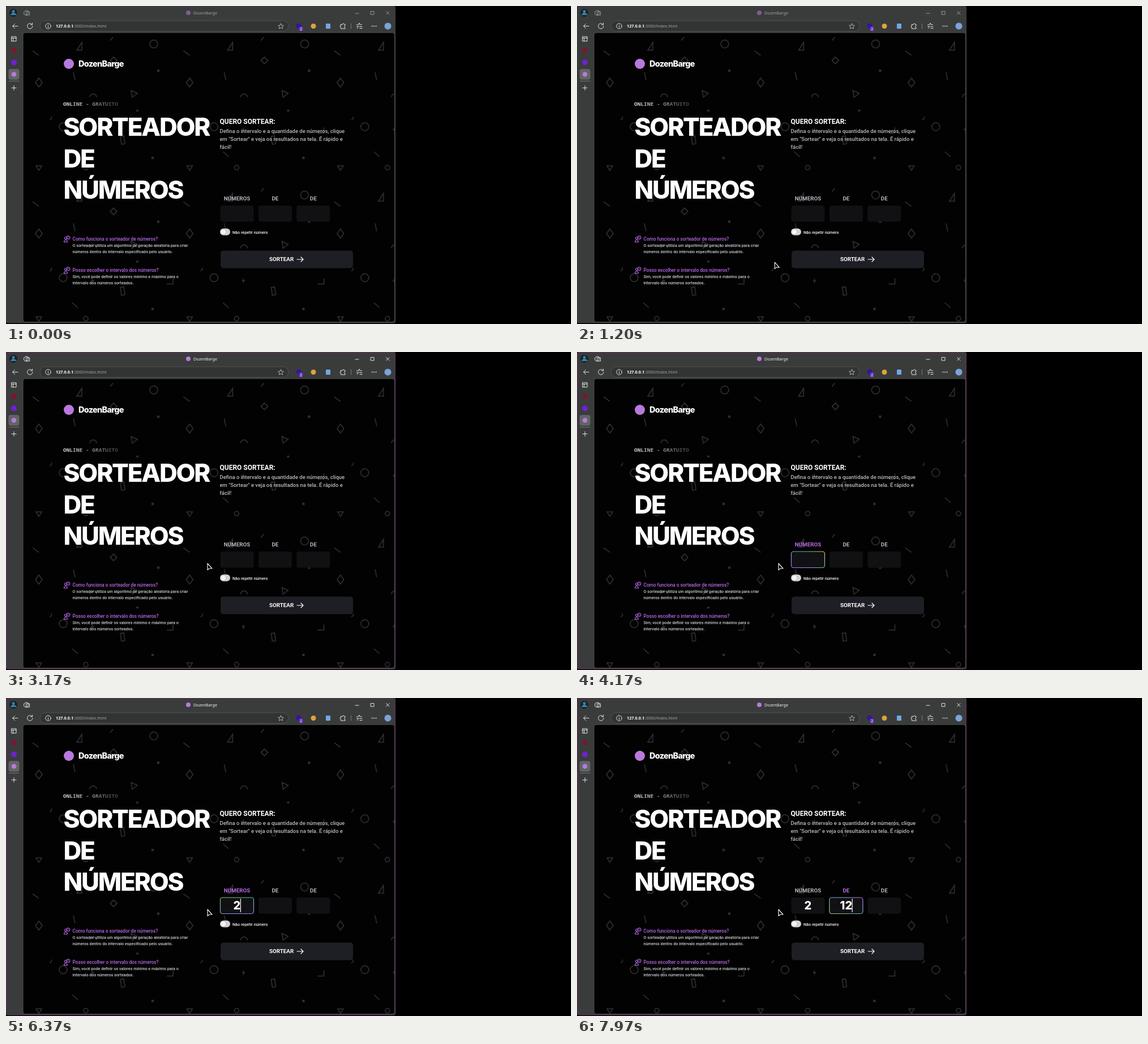
An HTML page for the animation above (8000 ms loop, 998x561 px).

```html
<!DOCTYPE html>
<html lang="pt">
<head>
<meta charset="utf-8">
<style>
html, body { margin: 0; width: 100%; height: 100%; overflow: hidden; background: #000; }
svg { display: block; width: 998px; height: 561px; }
text { white-space: pre; }
.ui { font: 7.3px "Noto Sans", "Open Sans", sans-serif; }
.body { font-family: Roboto, sans-serif; font-weight: 500; }
.bold { font-weight: 700; }
.display { font-family: Inter, sans-serif; font-weight: 800; letter-spacing: -.05em; fill: #fff; }
.mono { font: 600 9.5px "Noto Sans Mono", "DejaVu Sans Mono", monospace; }
.line { fill: none; stroke: #e2e2e2; stroke-linecap: round; stroke-linejoin: round; }
.mid { text-anchor: middle; }
</style>
</head>
<body>
<svg viewBox="0 0 998 561">
  <defs>
    <pattern id="confetti" x="30" y="47" width="266.4" height="266.4" patternUnits="userSpaceOnUse">
      <g fill="none" stroke="#343238" stroke-width="1.5">
        <circle cx="231" cy="20" r="7"/>
        <circle cx="71" cy="166" r="7"/>
        <circle cx="111" cy="238" r="4"/>
        <path d="M28 80l6 8-6 8-6-8zM160 43l6 6-6 6-6-6z"/>
        <path d="M104 17v14H95zM191 102l11 5-9 7zM23 235h10l-5 8z"/>
        <path d="M172 183l6-1 2 14-6 1zM254 177h11v-10"/>
        <path d="M118 114a6 6 0 0 1 12 0"/>
        <path d="M17 32l11 8M89 70l3 14M87 210l10 9M154 14l5-6M50 148q2 4-3 6"/>
      </g>
      <g fill="#343238">
        <path d="M237 65h4v4h-4zM227 219h4v4h-4zM200 136h4v3h-4z"/>
        <path d="M124 166l-4 6h3l-1 5 4-7h-3z"/>
      </g>
    </pattern>
    <linearGradient id="fade" gradientUnits="userSpaceOnUse" x1="101" x2="200" y1="0" y2="0">
      <stop stop-color="#d6d6d6"/><stop offset="1" stop-color="#3c3c46"/>
    </linearGradient>
    <linearGradient id="glow" gradientUnits="userSpaceOnUse">
      <stop stop-color="#b868e8"/><stop offset=".35" stop-color="#8aa0e8"/>
      <stop offset=".65" stop-color="#6ab8a0"/><stop offset="1" stop-color="#e0c070"/>
    </linearGradient>
  </defs>

  <rect width="998" height="561" fill="#000"/>
  <rect width="688" height="559.5" rx="3" fill="#3a3c3b"/>
  <rect id="accent" x=".5" y=".5" width="687" height="558.5" rx="3" fill="none" stroke="#652c62"/>

  <!-- title bar -->
  <g id="titleBar">
    <circle cx="322" cy="12" r="4" fill="#b979dc"/>
    <text class="ui" x="331" y="15" fill="#f0f0f0">DozenBarge</text>
    <path class="line" d="M617 13h6M644.5 9.5h5.500v5.500h-5.500zM671.500 9.500l5.500 5.500M677 9.500l-5.500 5.500"/>
    <path class="line" d="M32 10l4-2.500 3 1.500v5l-4 2.500-3-2zM36 10h5.500v6h-5.500z"/>
  </g>
  <circle cx="13" cy="12" r="7" fill="#14232e"/>
  <path d="M8 16q1-4 5-4t6 4z" fill="#3b81a0"/><circle cx="13" cy="9.500" r="2.500" fill="#3b81a0"/>

  <!-- toolbar -->
  <rect x="60" y="26" width="439" height="18.500" rx="9.200" fill="#323433" stroke="#505250"/>
  <path class="line" d="M21 35.500h-9.500l4-4M11.500 35.500l4 4M46 32.500a4.700 4.700 0 1 0 1 3M46.500 30v3h-3"/>
  <circle class="line" cx="74.500" cy="35.500" r="4.700"/>
  <path class="line" d="M74.500 35v3M74.500 33v.1"/>
  <text class="ui" x="88" y="38.300" fill="#a2a4a3"><tspan fill="#fff" font-weight="600">127.0.0.1</tspan>:3000/index.html</text>
  <path class="line" style="stroke:#bbb" stroke-width=".9" d="M485.500 31l1.400 3 3.400.4-2.500 2.300.7 3.300-3-1.700-3 1.700.7-3.300-2.500-2.300 3.400-.4z"/>
  <circle cx="517" cy="35" r="4.500" fill="#35149b"/>
  <rect x="517.500" y="36.500" width="7" height="7.500" rx="2" fill="#6b2fd0"/>
  <text class="ui mid" x="521" y="42.700" fill="#fff" style="font-size:6.500px">2</text>
  <circle cx="543" cy="35.500" r="4.500" fill="#dca43a"/>
  <rect x="565" y="31" width="8" height="9" rx="1" fill="#6fa8e4"/>
  <path class="line" d="M591.500 32.500h3a1.500 1.500 0 0 1 3 0h1.500v2.500a1.500 1.500 0 0 0 0 3v2h-7.500v-2.500a1.500 1.500 0 0 1 0-3z"/>
  <path class="line" style="stroke:#777" d="M609.500 31v9"/>
  <path class="line" d="M619.500 33h3l1.500-3 1.300 3h3.200M619.500 36h4M620.500 39.500l1-2M625 36.500h4M625 39.500h4"/>
  <path class="line" stroke-width="1.800" d="M646.500 35.500h.1M650 35.500h.1M653.500 35.500h.1"/>
  <circle cx="674.500" cy="35.500" r="6" fill="#7aa3d8"/>

  <!-- vertical tabs -->
  <path class="line" d="M10 54h8v8h-8zM10 56.500h8M12.500 56.500v5.500"/>
  <circle cx="14" cy="78.500" r="4.500" fill="#7c1630"/>
  <circle cx="14" cy="99.500" r="5" fill="#6f22d0"/>
  <rect x="4.500" y="111" width="19" height="19" rx="4" fill="#626463"/>
  <circle cx="14" cy="120.500" r="4.300" fill="#b979dc"/>
  <path d="M5 132.500h18.500" stroke="#777"/>
  <path class="line" d="M10 144.500h8M14 140.500v8"/>

  <!-- page -->
  <rect x="30" y="47" width="656.500" height="510.500" rx="4" fill="#010201" stroke="#4b504d"/>
  <rect x="31" y="48" width="655" height="509" rx="4" fill="url(#confetti)"/>
  <circle cx="111" cy="102" r="9" fill="#b979dc"/>
  <text class="display" x="128" y="106.500" font-size="14.500">DozenBarge</text>
  <text class="mono" x="101" y="175.700" fill="url(#fade)">ONLINE - GRATUITO</text>
  <g class="display" font-size="44">
    <text x="101.500" y="229">SORTEADOR</text>
    <text x="101.500" y="284.500">DE</text>
    <text x="101.500" y="339.500">NÚMEROS</text>
  </g>

  <g class="body">
    <g id="faq"></g>
    <text class="bold" x="377.500" y="208" font-size="12" fill="#fff">QUERO SORTEAR:</text>
    <g font-size="9.450" fill="#bcbcc2">
      <text x="377.500" y="224">Defina o intervalo e a quantidade de números, clique</text>
      <text x="377.500" y="238.200">em "Sortear" e veja os resultados na tela. É rápido e</text>
      <text x="377.500" y="252.400">fácil!</text>
    </g>
    <g id="fields"></g>
    <rect x="378" y="392.500" width="18" height="12" rx="6" fill="#d4d4d6"/>
    <circle cx="384" cy="398.500" r="5" fill="#f4f4f4" stroke="#a8a8a8" stroke-width=".7"/>
    <text x="400" y="402" font-size="7.200" fill="#f4f4f4">Não repetir número</text>
    <rect x="379" y="431.500" width="234" height="31" rx="5" fill="#1e1e25"/>
    <text class="bold" x="465" y="450.300" font-size="9.800" fill="#fff">SORTEAR</text>
    <path class="line" style="stroke:#fff" stroke-width="1.200" d="M514 447h11M521 443l4 4-4 4"/>
  </g>
  <path id="caret" d="M0 354v24" stroke="#fff" stroke-width="1.200"/>
  <path id="cursor" d="M0 0v11.500l3-2.500h5z" fill="#000" stroke="#f2f2f2" stroke-width="1.200" stroke-linejoin="round"/>
</svg>

<script>
const LOOP = 8000, BLINK = 530;
const ACTIVATE = 1250, FOCUS = [3300, 7350], FADE = 180;
const KEYS = [[6000, 0, "2"], [7630, 1, "1"], [7800, 1, "12"]];
const $ = id => document.getElementById(id);
const clamp = v => Math.min(1, Math.max(0, v));

const questions = [
  [414, "Como funciona o sorteador de números?",
    "O sorteador utiliza um algoritmo de geração aleatória para criar",
    "números dentro do intervalo especificado pelo usuário."],
  [469, "Posso escolher o intervalo dos números?",
    "Sim, você pode definir os valores mínimo e máximo para o",
    "intervalo dos números sorteados."]
];
$("faq").innerHTML = questions.map(([y, title, ...lines]) => `
  <g transform="translate(102 ${y - 9})" fill="none" stroke="#b868e8" stroke-width="1.100">
    <circle cx="3.500" cy="4.500" r="2"/><path d="M.5 11.500q0-3.500 3-3.500t3 3.500z"/>
    <circle cx="8" cy="3.500" r="2.800"/><path d="M8 2.200v1.700"/>
  </g>
  <text x="117.500" y="${y}" font-size="8.250" fill="#b868e8">${title}</text>
  ${lines.map((line, i) => `<text x="117.500" y="${y + 11 + i * 10.700}" font-size="7.200" fill="#ceced2">${line}</text>`).join("")}`
).join("");

const centers = [408, 475.400, 542.800];
$("fields").innerHTML = centers.map((x, i) => `<g>
  <text class="bold mid label" x="${x}" y="343" font-size="9.800">${i ? "DE" : "NÚMEROS"}</text>
  <rect x="${x - 29.500}" y="352" width="59" height="28.500" rx="4" fill="#111114"/>
  <rect class="ring" x="${x - 29.500}" y="352" width="59" height="28.500" rx="4" fill="none" stroke="url(#glow)" stroke-width="1.200"/>
  <text class="display mid value" style="letter-spacing:0" x="${x}" y="373" font-size="20"></text></g>`).join("");
const fields = [...$("fields").children].map(g => ({
  label: g.querySelector(".label"), ring: g.querySelector(".ring"), value: g.querySelector(".value")
}));

function draw(t) {
  const active = t >= ACTIVATE;
  $("accent").style.opacity = +active;
  $("titleBar").style.opacity = active ? 1 : .55;

  const slide = 1 - (1 - clamp((t - 1100) / 400)) ** 3;
  const y = 561 + ((t < 2400 ? 374 : 373) - 561) * slide;
  $("cursor").setAttribute("transform", `translate(${340 + 16 * slide} ${y})`);
  $("cursor").style.opacity = +(slide > 0);

  const focused = FOCUS.filter(start => t >= start).length - 1;
  fields.forEach(({ label, ring, value }, i) => {
    const fadeIn = clamp((t - (FOCUS[i] ?? LOOP)) / FADE);
    const fadeOut = clamp((t - (FOCUS[i + 1] ?? LOOP)) / FADE);
    const lit = fadeIn * (1 - fadeOut);
    label.style.fill = `color-mix(in srgb, #b868e8 ${lit * 100}%, #b4b4bb)`;
    ring.style.opacity = lit;
    value.textContent = KEYS.filter(([at, field]) => field === i && t >= at).pop()?.[2] ?? "";
  });

  const caretOn = focused >= 0;
  $("caret").style.opacity = 0;
  if (!caretOn) return;

  const cx = centers[focused], glow = $("glow");
  const angle = 2 * Math.PI * (t - 5570) / 2600 - Math.PI / 5;
  const dx = 30 * Math.cos(angle), dy = 30 * Math.sin(angle);
  Object.entries({ x1: cx + dx, y1: 366 + dy, x2: cx - dx, y2: 366 - dy })
    .forEach(([name, v]) => glow.setAttribute(name, v));

  const lastInput = Math.max(FOCUS[focused], ...KEYS.map(([at]) => at).filter(at => at <= t));
  const width = fields[focused].value.getComputedTextLength();
  $("caret").setAttribute("transform", `translate(${cx + width / 2} 0)`);
  $("caret").style.opacity = +((t - lastInput) % (2 * BLINK) < BLINK);
}

const origin = performance.now();
function frame() {
  draw((performance.now() - origin) % LOOP);
  requestAnimationFrame(frame);
}
frame();
</script>
</body>
</html>
```
